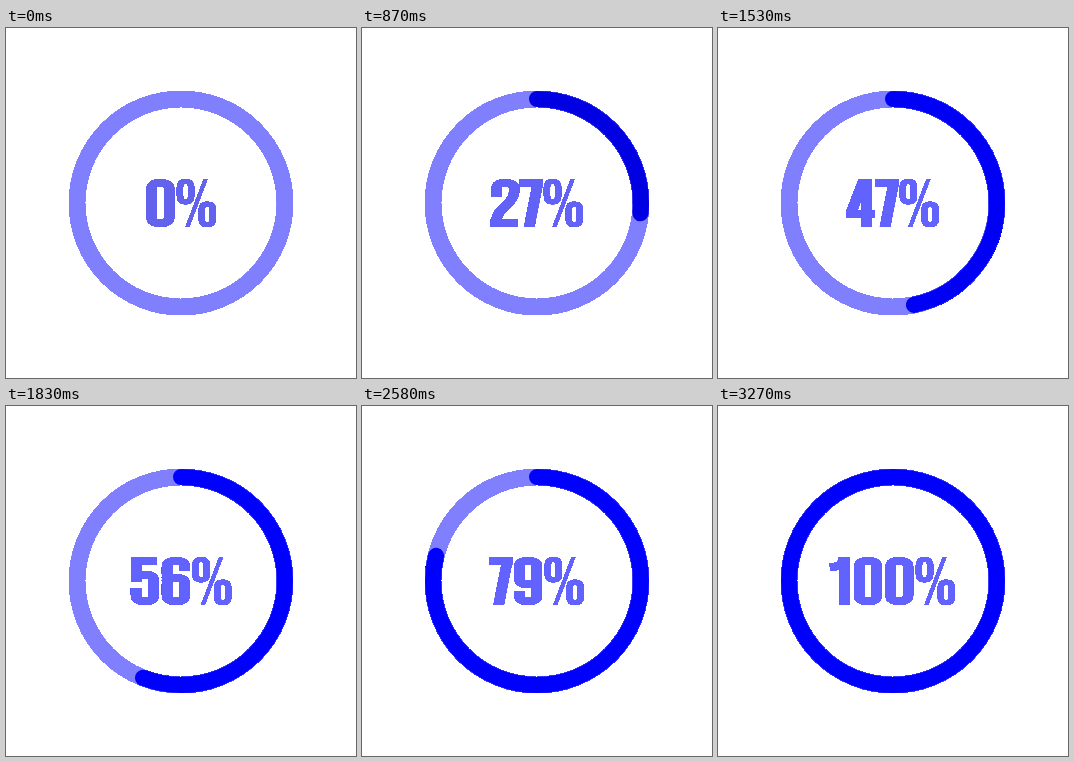
Animation, 350 px wide and 350 px high, one loop 3.6 s. Source, as an HTML page:

```html
<!DOCTYPE html>
<html lang="en">
<head>
<meta charset="utf-8">
<title>Progress ring</title>
<style>
html, body { margin: 0; width: 100%; height: 100%; overflow: hidden; background: #fff; }
svg { display: block; width: 100%; height: 100%; fill: none; }
circle { stroke-width: 16; }
</style>
</head>
<body>
<svg viewBox="0 0 350 350" role="img" aria-label="0%">
  <!-- Every touched pixel becomes opaque, giving hard outer edges -->
  <filter id="hard" color-interpolation-filters="sRGB">
    <feComponentTransfer><feFuncA type="linear" slope="50"/></feComponentTransfer>
  </filter>
  <clipPath id="line"><rect y="151" width="350" height="48"/></clipPath>
  <g filter="url(#hard)">
    <circle cx="175" cy="175" r="104" stroke="#8080ff"/>
    <circle id="arc" cx="175" cy="175" r="104" pathLength="100" stroke-linecap="round" transform="rotate(-90 175 175)"/>
    <g id="label" clip-path="url(#line)"></g>
  </g>
</svg>
<script>
const LOOP = 3600, STEP = 30, LAST = 109;

// Numerals are pen strokes on a small grid, widened so that stems are heavier than bars
const WIDEN = 1.4, PEN = 7.2, ROUND = 6;
const L = 4.8, C = 11.1, R = 17.4, T = 3.8, M = 23, B = 44.2;

// A line through the points with rounded corners
function trace(pts) {
  const end = pts.length - 1;
  return pts.map((p, i) => {
    if (i === 0) return 'M' + p;
    if (i === end) return 'L' + p;
    const toward = j => {
      const dx = pts[j][0] - p[0], dy = pts[j][1] - p[1], len = Math.hypot(dx, dy);
      const k = Math.min(ROUND, j % end ? len / 2 : len) / len;
      return [p[0] + dx * k, p[1] + dy * k];
    };
    return `L${toward(i - 1)}Q${p} ${toward(i + 1)}`;
  }).join('');
}

const stroke = (pts, pen = PEN) => `<path d="${trace(pts)}" stroke-width="${pen}"/>`;

function ring(l, t, r, b, pen) {
  const c = (l + r) / 2;
  return stroke([[c, t], [r, t], [r, b], [l, b], [l, t], [c, t]], pen);
}

// A half turn about the middle of the numeral
const turn = pts => pts.map(([x, y]) => [L + R - x, T + B - y]);
const six = [[R, 14], [R, T], [L, T], [L, B], [R, B], [R, 20.8], [L, 20.8]];

// [advance, strokes]
const GLYPHS = {
  0: [31.4, ring(L, T, R, B)],
  1: [22.5, stroke([[10.7, .4], [10.7, 47.6]]) + stroke([[.2, 10.2], [9, 9], [10, .4]])],
  2: [29.8, stroke([[L, 17.5], [L, T], [R, T], [R, 18], [L, 36], [L, B]]) + stroke([[.7, 43.9], [20.1, 43.9]])],
  3: [31, stroke([[L, 16], [L, T], [R, T], [R, M], [8.5, M]]) + stroke([[8.5, M], [R, M], [R, B], [L, B], [L, 30]])],
  4: [29.4, stroke([[13.2, -1], [4.1, 32]]) + stroke([[.3, 35.4], [20.5, 35.4]]) + stroke([[14.9, .4], [14.9, 47.6]])],
  5: [31, stroke([[19.7, 4.1], [1.6, 4.1]]) + stroke([[5.2, 4], [5.2, 24.6]]) +
      stroke([[5.2, 17.6], [R, 17.6], [R, B], [L, B], [L, 31]])],
  6: [31.4, stroke(six)],
  7: [23.6, stroke([[.2, 4.1], [16.7, 4.1]]) + stroke([[13.2, 3], [6.6, 50]])],
  8: [31.2, stroke([[C, M], [R, M], [R, T], [L, T], [L, M], [R, M], [R, B], [L, B], [L, M], [C, M]])],
  9: [31.4, stroke(turn(six))],
  '%': [41, ring(2.7, 2.3, 10.7, 23, 4.3) + ring(18.2, 25, 26.2, 45.7, 4.3) + stroke([[21.3, -1], [7.7, 49]], 2.4)]
};

const svg = document.querySelector('svg');
const arc = document.getElementById('arc');
const label = document.getElementById('label');
let shown = -1;

function write(text) {
  const glyphs = [...text].map(c => GLYPHS[c]);
  let x = 175 - glyphs.reduce((sum, g) => sum + g[0], 0) / 2;
  label.innerHTML = glyphs.map(([advance, strokes]) => {
    const g = `<g transform="translate(${x} 151) scale(${WIDEN} 1)">${strokes}</g>`;
    x += advance;
    return g;
  }).join('');
  svg.setAttribute('aria-label', text);
}

const blue = (base, low) => `rgb(${base}, ${base}, ${Math.min(255, Math.round(low))})`;

function draw(now) {
  const step = Math.min(LAST, Math.floor(now % LOOP / STEP));
  if (step !== shown) {
    shown = step;
    const pct = step / LAST * 100;
    arc.style.display = step ? '' : 'none';
    arc.setAttribute('stroke-dasharray', `${pct} 200`);
    arc.setAttribute('stroke', blue(0, 200 + pct));
    label.setAttribute('stroke', blue(98, 236 + pct * .4));
    write(Math.round(pct) + '%');
  }
  requestAnimationFrame(draw);
}
draw(performance.now());
</script>
</body>
</html>
```
